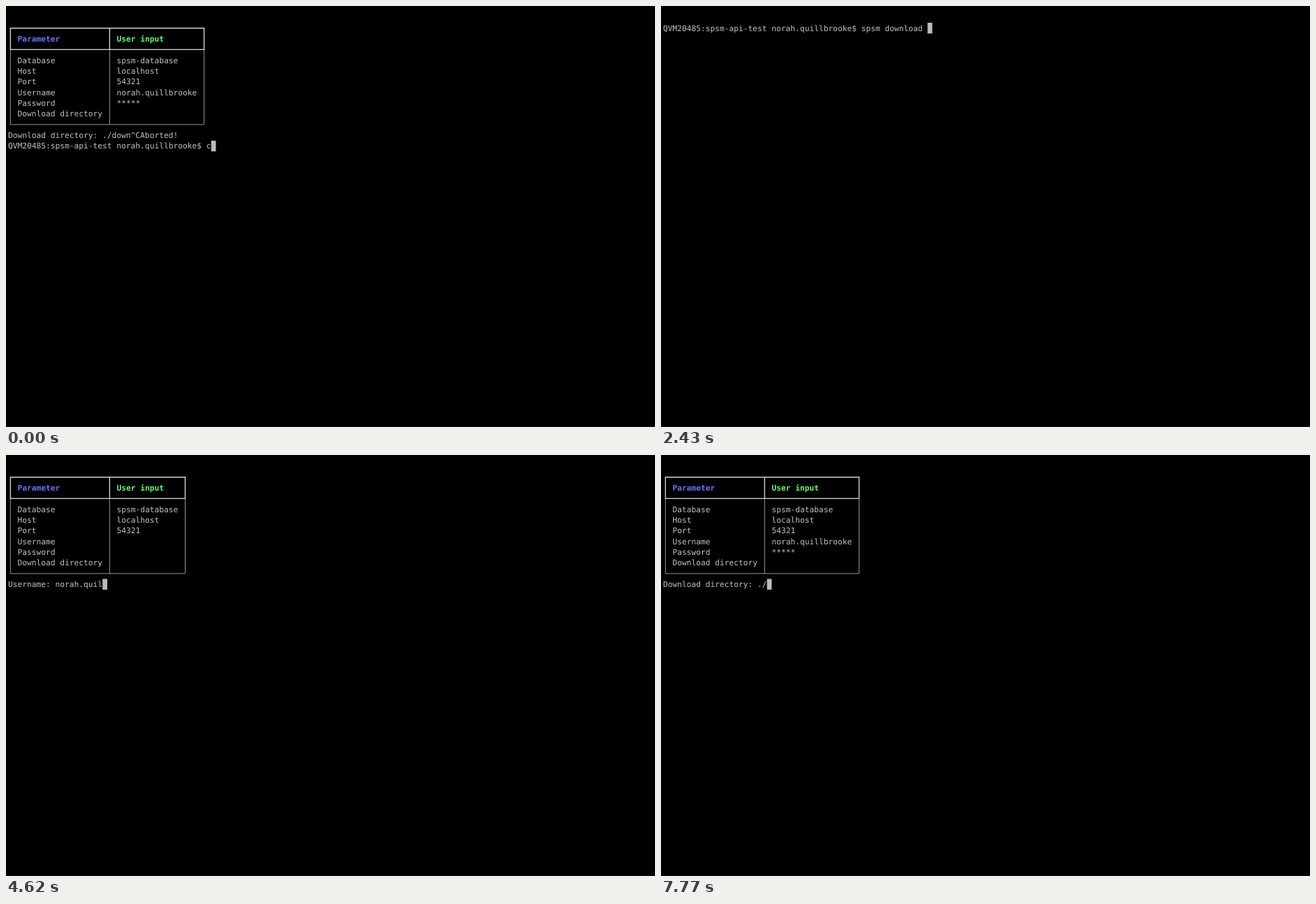
An HTML page with a canvas for the animation above (8 s loop, 929 by 603 pixels).

```html
<!DOCTYPE html>
<html lang="en">
<head>
<meta charset="utf-8">
<title>Terminal session</title>
<style>
  html, body { margin: 0; width: 100%; height: 100%; overflow: hidden; background: #000; }
  canvas { display: block; width: 929px; height: 603px; }
</style>
</head>
<body>
<canvas id="screen" width="929" height="603"></canvas>
<script>
const ctx = document.getElementById('screen').getContext('2d');
const LOOP = 8000;
const LEFT = 3, TOP = 24, CELL = 6.76, LINE = 15.35;
const FONT = '11.23px "DejaVu Sans Mono", monospace';
const TEXT = '#c1c1c1', BLUE = '#6871ff', GREEN = '#5ffa68';

const USER = 'norah.quillbrooke';
const PROMPT = `QVM20485:spsm-api-test ${USER}$ `;
const LABELS = ['Database', 'Host', 'Port', 'Username', 'Password', 'Download directory'];
const VALUES = ['spsm-database', 'localhost', '54321', USER, '*****'];

// Times at which each character of a typed string appears.
const KEYS = {
  clear: [0, 30, 90, 120, 180],
  command: [930, 990, 1080, 1140, 1530, 1680, 1740, 1830, 1920, 2040, 2130,
    2220, 2310, 2430, 2490, 2580, 2670, 2760, 2820],
  user: [3630, 3720, 3810, 3930, 4020, 4140, 4230, 4380, 4500, 4620,
    4770, 4830, 4890, 4980, 5040, 5130, 5220],
  path: [7680, 7770]
};

const colX = col => LEFT + col * CELL;
const rowY = row => TOP + row * LINE;
const midX = col => colX(col + 0.5);
const midY = row => rowY(row + 0.5);
const typed = (text, times, t) => text.slice(0, times.filter(time => time <= t).length);

function write(text, col, row, color = TEXT, bold = false) {
  ctx.font = (bold ? 'bold ' : '') + FONT;
  ctx.fillStyle = color;
  ctx.fillText(text, colX(col), rowY(row) + 11.6);
}

function cursor(col, row) {
  ctx.fillStyle = '#bbb';
  ctx.fillRect(colX(col), rowY(row), CELL, LINE);
}

function writeInput(text, row) {
  write(text, 0, row);
  cursor(text.length, row);
}

function box(left, top, right, bottom, divider, width, color) {
  ctx.lineWidth = width;
  ctx.strokeStyle = color;
  ctx.beginPath();
  ctx.rect(midX(left), midY(top), midX(right) - midX(left), midY(bottom) - midY(top));
  ctx.moveTo(midX(divider), midY(top));
  ctx.lineTo(midX(divider), midY(bottom));
  ctx.stroke();
}

function table(filled) {
  const values = VALUES.slice(0, filled);
  const right = 24 + Math.max(...values.map(value => value.length));
  box(0, 2, right, 9, 21, 0.9, '#a5a5a5');
  box(0, 0, right, 2, 21, 1.4, '#d0d0d0');
  write('Parameter', 2, 1, BLUE, true);
  write('User input', 23, 1, GREEN, true);
  LABELS.forEach((label, i) => write(label, 2, i + 3));
  values.forEach((value, i) => write(value, 23, i + 3));
}

function keyIcon(col, row) {
  const x = midX(col) + 0.2, y = rowY(row);
  ctx.strokeStyle = '#fff';
  ctx.lineWidth = 1.6;
  ctx.beginPath();
  ctx.arc(x, y + 3.6, 2.4, 0, 2 * Math.PI);
  ctx.moveTo(x, y + 6);
  ctx.lineTo(x, y + 14.4);
  ctx.moveTo(x, y + 10.4);
  ctx.lineTo(x + 2.4, y + 10.4);
  ctx.moveTo(x, y + 13.4);
  ctx.lineTo(x + 2.9, y + 13.4);
  ctx.stroke();
}

function abortedScreen(t) {
  table(5);
  write('Download directory: ./down^CAborted!', 0, 10);
  const line = PROMPT + typed('clear', KEYS.clear, t);
  if (t < 240) return writeInput(line, 11);
  write(line, 0, 11);
  cursor(0, 12);
}

function commandScreen(t) {
  const line = PROMPT + typed('spsm download table', KEYS.command, t);
  if (t < 2910) return writeInput(line, 0);
  write(line, 0, 0);
  cursor(0, 1);
}

function usernameScreen(t) {
  table(3);
  if (t >= 3240) writeInput('Username: ' + typed(USER, KEYS.user, t), 10);
}

function passwordScreen(t) {
  const label = 'Password []: ';
  table(4);
  write(label, 0, 10);
  (t < 5490 ? cursor : keyIcon)(label.length, 10);
}

function directoryScreen(t) {
  table(5);
  writeInput('Download directory: ' + typed('./', KEYS.path, t), 10);
}

const SCENES = [
  [270, abortedScreen],
  [300, () => cursor(0, 0)],
  [3150, commandScreen],
  [3180, () => {}],
  [5400, usernameScreen],
  [6990, passwordScreen],
  [LOOP, directoryScreen]
];

function draw(t) {
  ctx.fillStyle = '#000';
  ctx.fillRect(0, 0, 929, 603);
  ctx.fillStyle = '#161616';
  ctx.fillRect(0, 602, 929, 1);
  SCENES.find(([end]) => t < end)[1](t);
}

ctx.textRendering = 'geometricPrecision';
const start = performance.now();
function tick() {
  draw((performance.now() - start) % LOOP);
  requestAnimationFrame(tick);
}
tick();
</script>
</body>
</html>
```
